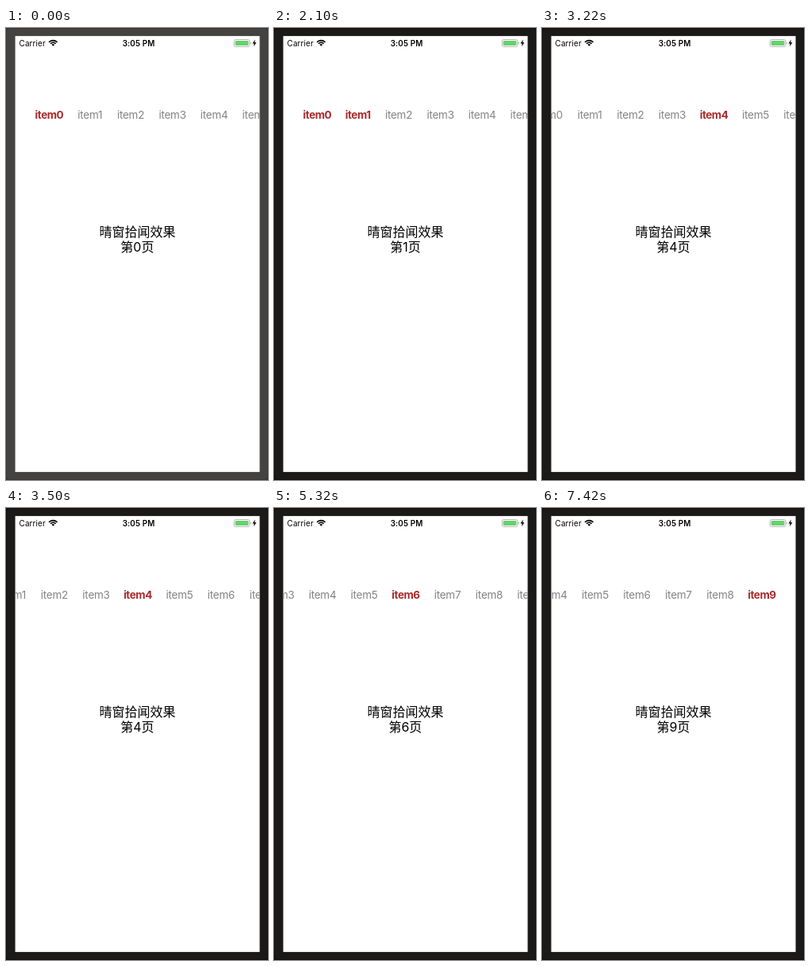
These frames come from a looping animation (330 by 568 pixels, 8260 ms). An HTML page with a canvas:

```html
<!DOCTYPE html>
<html lang="zh-CN">
<head>
<meta charset="utf-8">
<title>Tab strip</title>
<style>
  html, body { margin: 0; width: 100%; height: 100%; overflow: hidden; background: #fff; }
  canvas { display: block; width: 330px; height: 568px; }
</style>
</head>
<body>
<canvas id="stage"></canvas>
<script>
const W = 330, H = 568, LOOP = 8260, STEP = 70;
const SCREEN = { x: 11.6, y: 10.1, w: 307.9, h: 547.8 };
const MID = 166, MAX_SCROLL = 247.7, SCROLL_MS = 300;
const SANS = 'Inter, "Noto Sans CJK SC", "Noto Sans CJK JP", sans-serif';

// Each tap: when the page switches, when the strip starts to scroll, which tabs are lit.
const TAPS = [
  { at: 0, scroll: 0, page: 0, lit: [0] },
  { at: 1820, scroll: 1820, page: 1, lit: [0, 1] },
  { at: 2520, scroll: 2490, page: 3, lit: [3] },
  { at: 3150, scroll: 3185, page: 4, lit: [4] },
  { at: 4200, scroll: 4260, page: 6, lit: [6] },
  { at: 5530, scroll: 5492, page: 8, lit: [8] },
  { at: 7000, scroll: 7000, page: 9, lit: [9] }
];

const canvas = document.getElementById('stage');
const ctx = canvas.getContext('2d');
const ratio = window.devicePixelRatio || 1;
canvas.width = W * ratio;
canvas.height = H * ratio;

const clamp = (v, lo, hi) => Math.min(hi, Math.max(lo, v));
const ease = p => p * p * (3 - 2 * p);
const tabCenter = i => i < 3 ? 54.4 + 51.3 * i : 209.6 + 52.5 * (i - 3);
const restScroll = i => clamp(tabCenter(i) - MID, 0, MAX_SCROLL);

function scrollAt(t) {
  let offset = 0;
  for (const tap of TAPS) {
    const p = clamp((t - tap.scroll) / SCROLL_MS, 0, 1);
    offset += (restScroll(tap.page) - offset) * ease(p);
  }
  return offset;
}

function text(str, x, y, size, { weight = 400, color = '#000', align = 'center', spacing = 0 } = {}) {
  ctx.font = `${weight} ${size}px ${SANS}`;
  ctx.letterSpacing = spacing + 'px';
  ctx.textAlign = align;
  ctx.fillStyle = color;
  ctx.fillText(str, x, y);
}

function roundRect(x, y, w, h, r) {
  ctx.beginPath();
  ctx.roundRect(x, y, w, h, r);
}

function drawBezel(t) {
  const early = t < 1050;
  ctx.fillStyle = early ? '#373634' : '#11100f';
  ctx.fillRect(0, 0, W, H);
  ctx.fillStyle = early ? '#444341' : '#1c1a19';
  roundRect(1, 1, W - 2, H - 2, 3);
  ctx.fill();
  ctx.fillStyle = '#fff';
  ctx.fillRect(SCREEN.x, SCREEN.y, SCREEN.w, SCREEN.h);
}

function drawWifi(x, y) {
  ctx.strokeStyle = ctx.fillStyle = '#000';
  ctx.lineWidth = 1.6;
  for (const r of [4.5, 7.2]) {
    ctx.beginPath();
    ctx.arc(x, y, r, -Math.PI * 0.76, -Math.PI * 0.24);
    ctx.stroke();
  }
  ctx.beginPath();
  ctx.moveTo(x, y);
  ctx.arc(x, y, 2.6, -Math.PI * 0.76, -Math.PI * 0.24);
  ctx.fill();
}

function drawBattery() {
  ctx.strokeStyle = '#b0b0b0';
  ctx.lineWidth = 0.9;
  roundRect(287.2, 14.5, 19.6, 9, 2.2);
  ctx.stroke();
  ctx.fillStyle = '#66d16c';
  roundRect(288.6, 15.9, 16.8, 6.2, 1.1);
  ctx.fill();
  ctx.fillStyle = '#b0b0b0';
  roundRect(307.5, 17.4, 1.2, 3.2, 0.6);
  ctx.fill();
  ctx.fillStyle = '#000';
  ctx.beginPath();
  [[313.8, 14.6], [310.4, 19.5], [312.6, 19.5], [311.9, 23.2], [315.4, 18.2], [313.2, 18.2]]
    .forEach(([x, y]) => ctx.lineTo(x, y));
  ctx.fill();
}

function drawStatusBar() {
  text('Carrier', 16.6, 22.7, 9.9, { align: 'left', spacing: 0.12 });
  drawWifi(59.3, 22.8);
  text('3:05 PM', 167.1, 22.7, 9.9, { weight: 600, spacing: 0.12 });
  drawBattery();
}

function drawTabs(t, lit) {
  const offset = scrollAt(t);
  ctx.save();
  ctx.beginPath();
  ctx.rect(SCREEN.x, SCREEN.y, SCREEN.w, SCREEN.h);
  ctx.clip();
  for (let i = 0; i < 10; i++) {
    const on = lit.includes(i);
    text('item' + i, tabCenter(i) - offset, 114, 13.5, {
      weight: on ? 700 : 400,
      color: on ? '#a92a2a' : '#848484',
      spacing: on ? -0.45 : -0.25
    });
  }
  ctx.restore();
}

function draw(t) {
  const tap = TAPS.filter(s => s.at <= t).pop();
  ctx.setTransform(ratio, 0, 0, ratio, 0, 0);
  drawBezel(t);
  drawStatusBar();
  drawTabs(t, tap.lit);
  text('晴窗拾闻效果', 165.6, 262, 16);
  text(`第${tap.page}页`, 165.4, 280.6, 16);
}

const start = performance.now();
function tick() {
  const t = (performance.now() - start) % LOOP;
  draw(Math.floor(t / STEP) * STEP);
  requestAnimationFrame(tick);
}
tick();
</script>
</body>
</html>
```
